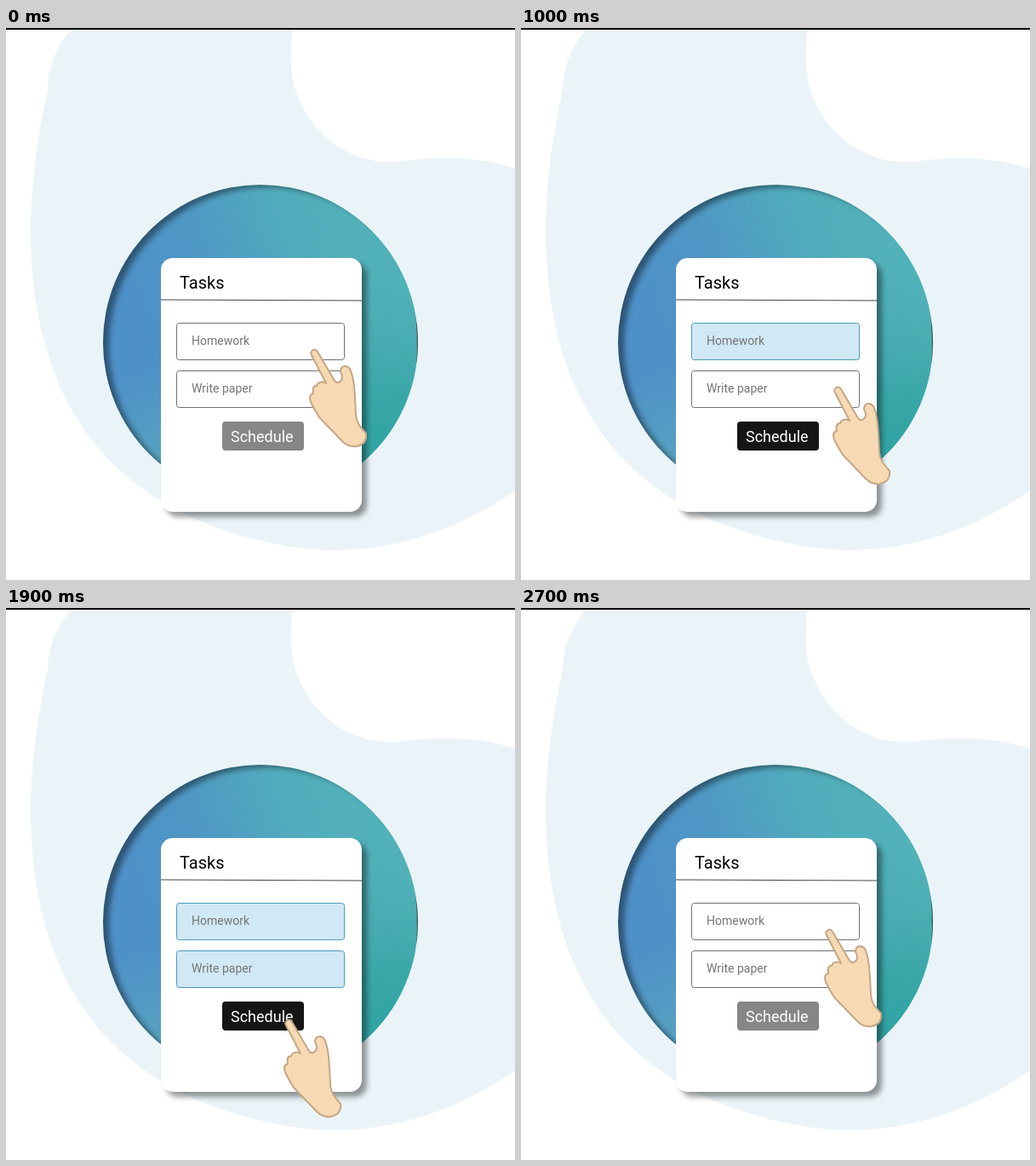
An HTML page for the animation above (2.8 s loop, 598 by 648 pixels).

```html
<!DOCTYPE html>
<html lang="en">
<head>
<meta charset="utf-8">
<title>Tasks</title>
<style>
  html, body { margin: 0; width: 100%; height: 100%; overflow: hidden; background: #fff; }
  svg { display: block; font-family: Roboto, sans-serif; }
  .card { filter: drop-shadow(6px 6px 3px rgba(0, 0, 0, .4)); }
  .field rect { fill: #fff; stroke: #6f6f73; }
  .field.on rect { fill: #d1e8f5; stroke: #4a9bbd; }
  .field text { font-size: 14px; fill: #757575; }
  #button { fill: #868686; }
  #button.on { fill: #151515; }
</style>
</head>
<body>
<svg width="598" height="648" viewBox="0 0 598 648">
  <defs>
    <linearGradient id="sea" gradientUnits="userSpaceOnUse" x1="150" y1="345" x2="440" y2="250">
      <stop offset="0" stop-color="#4e90c8"/>
      <stop offset=".3" stop-color="#4f97c5"/>
      <stop offset=".7" stop-color="#51adbc"/>
      <stop offset="1" stop-color="#52b2b9"/>
    </linearGradient>
    <radialGradient id="green" gradientUnits="userSpaceOnUse" cx="450" cy="500" r="240">
      <stop offset="0" stop-color="#2fa3a2"/>
      <stop offset=".3" stop-color="#35a5a5" stop-opacity=".85"/>
      <stop offset="1" stop-color="#52b0b8" stop-opacity="0"/>
    </radialGradient>
    <radialGradient id="mist" gradientUnits="userSpaceOnUse" cx="200" cy="520" r="130">
      <stop offset="0" stop-color="#58a6bf"/>
      <stop offset="1" stop-color="#58a6bf" stop-opacity="0"/>
    </radialGradient>
    <clipPath id="disc"><circle cx="299" cy="369" r="185"/></clipPath>
    <filter id="soft"><feGaussianBlur stdDeviation="3"/></filter>
  </defs>

  <path fill="#eaf4f8" d="M78 0C58 24 50 44 49 72C38 122 29 180 29 240C30 400 90 566 330 608
    C430 626 525 594 598 543V165C566 154 520 149 470 156C388 168 330 96 335 30L336 0Z"/>
  <rect width="598" height="2"/>

  <g clip-path="url(#disc)">
    <rect x="114" y="184" width="370" height="370" fill="url(#sea)"/>
    <rect x="114" y="184" width="370" height="370" fill="url(#mist)"/>
    <rect x="114" y="184" width="370" height="370" fill="url(#green)"/>
    <path fill="#4b4a55" d="M481 333Q484 366 482 399H490V333Z"/>
    <circle cx="307" cy="373" r="193" fill="none" stroke="#000" stroke-opacity=".42" stroke-width="14" filter="url(#soft)"/>
  </g>

  <rect class="card" x="182" y="270" width="236" height="298" rx="14" fill="#fff"/>
  <text x="204" y="306" font-size="20">Tasks</text>
  <path d="M182 319L418 320" stroke="#444"/>

  <g class="field" id="first">
    <rect x="200.5" y="346.5" width="197" height="43" rx="3"/>
    <text x="218" y="372">Homework</text>
  </g>
  <g class="field" id="second">
    <rect x="200.5" y="402.5" width="197" height="43" rx="3"/>
    <text x="218" y="428">Write paper</text>
  </g>
  <rect id="button" x="254" y="462" width="96" height="34" rx="4"/>
  <text x="264" y="486" font-size="18" fill="#fff">Schedule</text>

  <path id="hand" fill="#f7dab4" stroke="#c5a685" stroke-width="2" stroke-linejoin="round"
    d="M359 384C356 379 363 375 366 380L386 414Q388 417 391 416C396 414 396 408 393 404
    C393 396 400 395 404 400C409 410 410 428 411 454C412 465 417 469 423 476
    C424 484 421 489 412 491C405 492 399 489 395 485L368 457C361 446 360 443 358 439
    C356 433 357 430 361 429C360 423 361 420 365 420C366 416 371 414 376 417Z"/>
</svg>
<script>
  const LOOP = 2800;
  const el = id => document.getElementById(id);
  const between = (t, from, to) => t >= from && t < to;

  function draw(now) {
    const t = now % LOOP;
    const firstOn = between(t, 300, 2500);
    el('first').classList.toggle('on', firstOn);
    el('button').classList.toggle('on', firstOn);
    el('second').classList.toggle('on', between(t, 1400, 2500));

    // The hand jumps from the first field to the second, then to the button.
    const [x, y] = between(t, 900, 1900) ? [10, 44]
      : between(t, 1900, 2500) ? [-30, 106] : [0, 0];
    el('hand').setAttribute('transform', `translate(${x} ${y})`);
    requestAnimationFrame(() => draw(performance.now()));
  }
  draw(performance.now());
</script>
</body>
</html>
```
